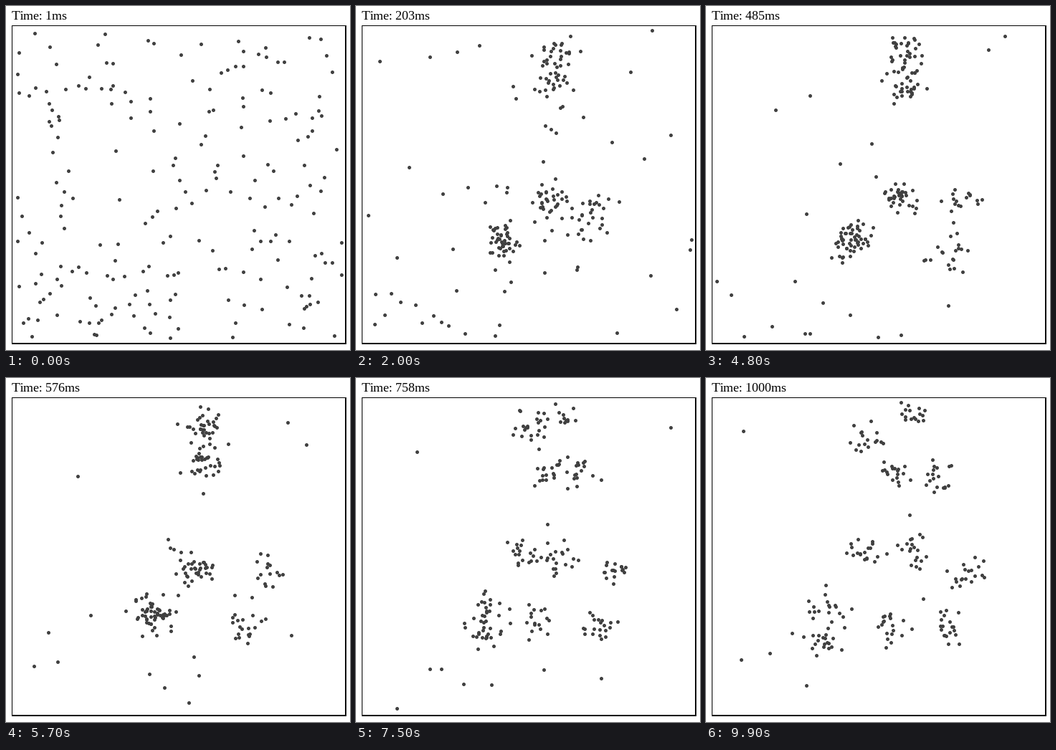
A matplotlib script for the animation above (10 s loop, 480 by 480 pixels).

```python
import numpy as np
import matplotlib.pyplot as plt
from matplotlib.animation import FuncAnimation
from matplotlib.patches import Rectangle

SIZE, DPI = 480, 100
FRAMES, STEP_MS = 100, 100
LOW, HIGH = np.array([14, 33]), np.array([469, 464])
PX = 72 / DPI
PULL, SPREAD, STRIDE, PER_SWARM = 0.35, 12.5, 14, 19
EARLY, LATE = (5, 32), (42, 90)

# Each gathering point splits over a span of frames into smaller swarms.
SPLITS = [
    ((276, 62), LATE, [(226, 80), (287, 48)]),
    ((274, 106), LATE, [(265, 130), (322, 142)]),
    ((268, 268), LATE, [(217, 238), (288, 243)]),
    ((304, 286), EARLY, [(362, 266), (337, 346)]),
    ((203, 325), LATE, [(257, 345), (167, 322), (165, 368)]),
]


def smooth(t):
    t = np.clip(t, 0, 1)
    return t * t * (3 - 2 * t)


def centres(frame):
    points = []
    for start, (begin, end), targets in SPLITS:
        k = smooth((frame - begin) / (end - begin))
        points += [(1 - k) * np.array(start) + k * np.array(p)
                   for p in targets]
    return np.array(points)


def simulate():
    """Random walkers that are drawn one by one into drifting swarms."""
    rng = np.random.default_rng(12)
    swarm = np.repeat(np.arange(len(centres(0))), PER_SWARM)
    shape = (len(swarm), 2)

    pos = rng.uniform(LOW, HIGH, shape)
    reach = np.hypot(*(centres(0)[swarm] - pos).T)
    join = 0.07 * reach * rng.exponential(size=len(swarm)) ** 1.5
    jitter = SPREAD * np.sqrt(1 - (1 - PULL) ** 2)

    track = [pos]
    for frame in range(1, FRAMES):
        joined = (frame > join)[:, None]
        noise = rng.normal(size=shape)
        homing = PULL * (centres(frame)[swarm] - pos) + jitter * noise
        pos = pos + np.where(joined, homing, STRIDE * noise)
        # Bounce off the walls.
        pos = np.where(pos < LOW, 2 * LOW - pos, pos)
        pos = np.where(pos > HIGH, 2 * HIGH - pos, pos)
        track.append(pos)
    return np.round(track) + 0.5


track = simulate()

# Whole-pixel glyph spacing.
plt.rcParams["text.hinting_factor"] = 1
plt.rcParams["text.hinting"] = "native"

fig = plt.figure(figsize=(SIZE / DPI, SIZE / DPI), dpi=DPI, facecolor="white")
ax = fig.add_axes([0, 0, 1, 1])
ax.set(xlim=(0, SIZE), ylim=(SIZE, 0))
ax.axis("off")

# The frame is thicker on its right and bottom sides.
ax.add_patch(Rectangle((8, 27), 467, 445, fc="black", lw=0))
ax.add_patch(Rectangle((9, 28), 464, 442, fc="white", lw=0))
label = ax.text(8, 19, "", family="Liberation Serif", size=18 * PX,
                color="black", va="baseline")
dots, = ax.plot([], [], "o", ms=5 * PX, mfc="#404040", mew=0)


def update(frame):
    label.set_text(f"Time: {round(1 + frame * 999 / (FRAMES - 1))}ms")
    dots.set_data(*track[frame].T)
    return label, dots


anim = FuncAnimation(fig, update, frames=FRAMES, interval=STEP_MS,
                     repeat=True, repeat_delay=0)
plt.show()
```
